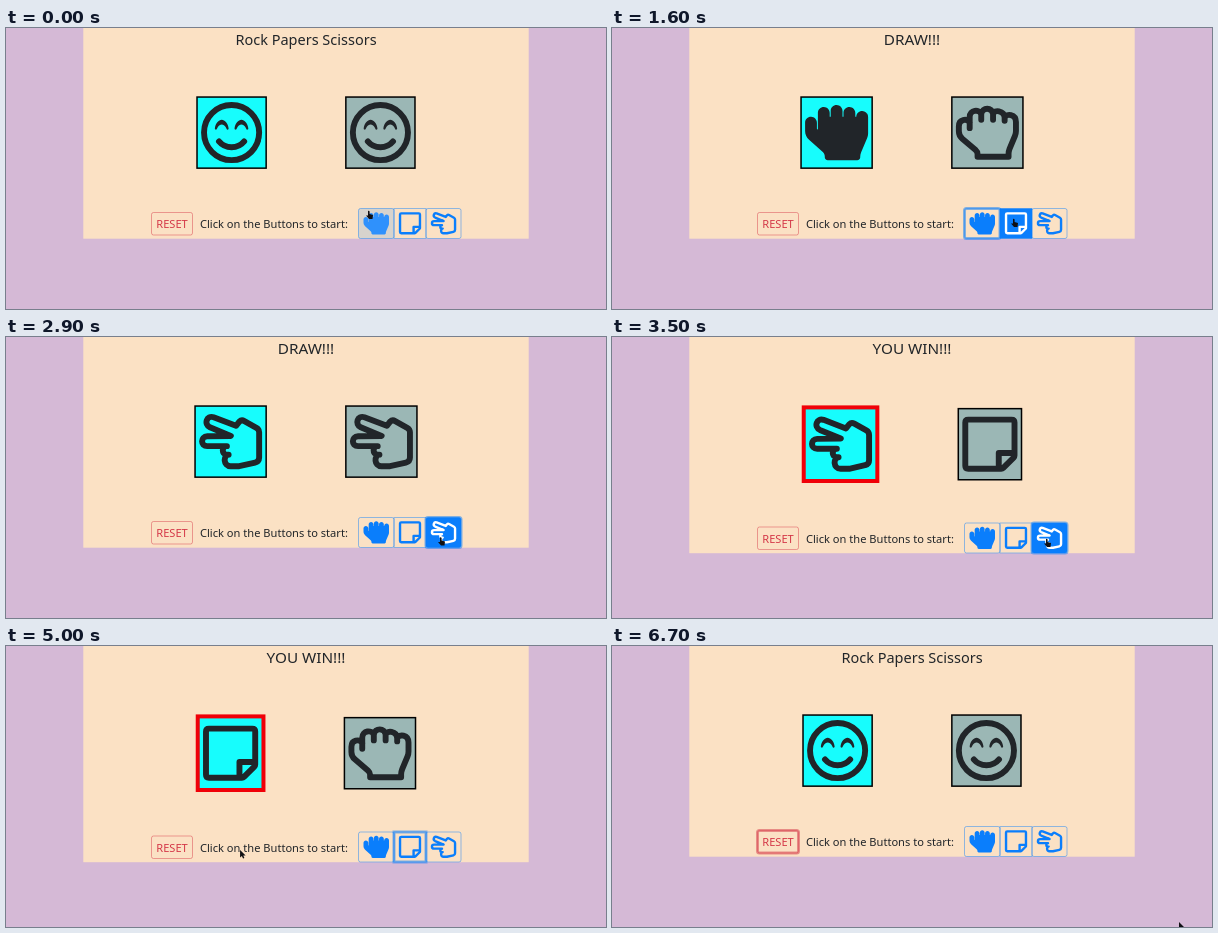
An HTML page that plays this animation: 600 by 281 pixels, repeating every 6800 ms.

```html
<!DOCTYPE html>
<html lang="en">
<head>
<meta charset="utf-8">
<title>Rock Papers Scissors</title>
<style>
  html, body { margin: 0; width: 100%; height: 100%; overflow: hidden; background: #d5b9d6; }
  svg { display: block; width: 600px; height: 281px; }
  text { font-family: "Noto Sans", "Open Sans", sans-serif; font-size: 11.1px; fill: #212529; }
  .line { fill: none; stroke: currentColor; stroke-width: 48; stroke-linecap: round; stroke-linejoin: round; }
  .solid { fill: currentColor; }
  .box { color: #212529; }
</style>
</head>
<body>
<svg viewBox="0 0 600 281">
  <defs>
    <g id="smile" class="line">
      <circle cx="248" cy="256" r="224"/>
      <path d="M145.500 328C197 391 299 391 350.500 328"/>
      <path id="eye" class="solid" stroke="none" d="M136.500 211c7.700-13.700 19.200-21.600 31.500-21.600s23.800 7.900 31.500 21.600l9.500 17c2.100 3.700 6.200 4.700 9.300 3.700 3.600-1.100 6-4.500 5.700-8.300-3.300-42.100-32.200-71.400-56-71.400s-52.700 29.300-56 71.400c-.3 3.700 2.100 7.200 5.700 8.300 3.400 1.100 7.400-.5 9.300-3.700z"/>
      <use href="#eye" x="160"/>
    </g>
    <path id="fist" class="solid" d="M464.800 80c-26.900-.4-48.800 21.200-48.800 48h-8V96.800c0-26.300-20.900-48.300-47.200-48.800-26.900-.4-48.800 21.200-48.800 48v32h-8V80.800c0-26.300-20.900-48.300-47.200-48.800-26.900-.4-48.800 21.200-48.800 48v48h-8V96.800c0-26.300-20.900-48.300-47.200-48.800-26.900-.4-48.800 21.200-48.800 48v136l-8-7.100v-48.100c0-26.300-20.900-48.300-47.200-48.800C21.900 127.600 0 149.200 0 176v66.400c0 27.400 11.700 53.500 32.200 71.800l111.700 99.300c10.200 9.100 16.100 22.200 16.100 35.900v6.700c0 13.300 10.700 24 24 24h240c13.300 0 24-10.700 24-24v-2.900c0-12.800 2.600-25.500 7.500-37.300l49-116.300c5-11.800 7.500-24.500 7.500-37.300V128.800c0-26.300-20.900-48.400-47.200-48.800z"/>
    <path id="rock" class="line" d="M112 220V130C112 70 190 64 206 106C214 46 296 50 302 104C310 68 392 74 396 134C410 98 488 104 488 170V242Q488 262 480 282L436 388Q428 408 428 428V452H176V432Q176 412 158 396L52 306Q24 282 24 246V204C24 146 88 138 112 174M206 106V152M302 104V152M396 134V160"/>
    <path id="note" class="line" d="M48 56H400Q424 56 424 80V348Q424 358 417 365L333 449Q326 456 316 456H48Q24 456 24 432V80Q24 56 48 56ZM296 448V328H416"/>
    <path id="scissors" class="line" d="M256 456H326L455 427Q488 419 488 386V181Q488 156 466 144L368 89Q345 76 327 94L300 128L118 58C62 40 36 116 88 140L258 210L66 213C10 215 10 293 66 293H226C184 293 180 358 224 362H240C194 366 196 456 256 456Z"/>
    <path id="hand" d="M1 0Q2 -.5 2.600 .5V3L6 4L5.500 8H2L-1 4.500L1 4.500Z"/>
    <path id="arrow" d="M0 0V7.500L1.800 6L3 8.500L4.300 8L3.200 5.500H5.500Z"/>
  </defs>
  <rect width="600" height="281" fill="#d5b9d6"/>
  <rect id="panel" x="77.300" width="445.400" fill="#fbe1c4"/>
  <text id="title" x="300" y="17" text-anchor="middle"></text>
  <g id="boxes"></g>
  <g id="controls">
    <text x="194" y="200">Click on the Buttons to start:</text>
  </g>
  <use id="cursor" fill="#101014"/>
</svg>
<script>
const LOOP = 6800, STEP = 100, GROW = 5.5;
const ICON = 63, PAD = 6.6, GAP = 78.2;
const BLUE = [10, 126, 252], RED = [212, 56, 72], WHITE = [255, 255, 255];
const iconWidth = { smile: 496, fist: 512, rock: 512, note: 448, scissors: 512 };

// start, title, player icon, rival icon, player wins, focused button
const rounds = [
  [0, "Rock Papers Scissors", "smile", "smile", false, ""],
  [300, "DRAW!!!", "fist", "rock", false, "fist"],
  [1700, "YOU WIN!!!", "note", "rock", true, "note"],
  [2800, "DRAW!!!", "scissors", "scissors", false, "scissors"],
  [3300, "YOU WIN!!!", "scissors", "note", true, "scissors"],
  [4300, "YOU WIN!!!", "note", "rock", true, "note"],
  [5400, "Rock Papers Scissors", "smile", "smile", false, "reset"]
];

// time, x, y of the pointer tip
const path = [
  [0, 361, 183], [300, 371, 189], [800, 371, 189], [1000, 372, 189], [1300, 372, 189],
  [1600, 400, 191], [2100, 401, 192], [2300, 402, 194], [2600, 433, 200], [3500, 433, 202],
  [3900, 432, 204], [4200, 402, 207], [4600, 400, 207], [5200, 176, 203], [5300, 180, 207],
  [5400, 181, 208.5], [5500, 183, 210], [6000, 578, 273], [6700, 567, 276]
];

const buttons = [
  { name: "reset", x: 145.5, y: 184.5, w: 41, h: 22.5, color: RED },
  { name: "fist", x: 352.5, y: 180.5, w: 35.5, h: 30, color: BLUE },
  { name: "note", x: 388, y: 180.5, w: 32, h: 30, color: BLUE },
  { name: "scissors", x: 420, y: 180.5, w: 35, h: 30, color: BLUE }
];

const byId = id => document.getElementById(id);
const rgb = (c, a = 1) => `rgba(${c.join()},${a})`;
const mix = (a, b, k) => a.map((v, i) => Math.round(v + (b[i] - v) * k));

function add(parent, tag, attrs = {}) {
  const el = document.createElementNS("http://www.w3.org/2000/svg", tag);
  set(el, attrs);
  return parent.appendChild(el);
}

function set(el, attrs) {
  for (const key in attrs) el.setAttribute(key, attrs[key]);
}

function placeIcon(el, name, cx, cy, size) {
  const k = size / 512;
  set(el, {
    href: "#" + name,
    transform: `translate(${cx - iconWidth[name] * k / 2} ${cy - size / 2}) scale(${k})`
  });
}

const boxes = ["#17fdfd", "#9bb7b5"].map(fill => {
  const g = add(byId("boxes"), "g", { class: "box" });
  return { rect: add(g, "rect", { fill }), icon: add(g, "use") };
});

for (const b of buttons) {
  const g = b.group = add(byId("controls"), "g");
  const frame = { x: b.x, y: b.y, width: b.w, height: b.h, rx: b.name === "note" ? 0 : 2 };
  b.ring = add(g, "rect", { ...frame, fill: "none", stroke: rgb(b.color, 0.5), "stroke-width": 3 });
  b.face = add(g, "rect", { ...frame, stroke: rgb(b.color, 0.45) });
  if (b.name === "reset") {
    b.label = add(g, "text", { x: 166, y: 200, "text-anchor": "middle" });
    b.label.textContent = "RESET";
  } else {
    b.label = add(g, "use");
    placeIcon(b.label, b.name, b.x + b.w / 2, 195.3, 25.5);
  }
}

const roundAt = t => rounds.filter(r => r[0] <= t).pop();
const shiftAt = t => roundAt(t)[4] ? GROW : 0;

function pointerAt(t) {
  const i = path.findIndex(p => p[0] > t);
  if (i < 0) return path[path.length - 1].slice(1);
  const [a, b] = [path[i - 1], path[i]];
  const k = (t - a[0]) / (b[0] - a[0]);
  const e = k * k * (3 - 2 * k);
  return [a[1] + (b[1] - a[1]) * e, a[2] + (b[2] - a[2]) * e];
}

function hovers(b, t) {
  const time = (t + LOOP) % LOOP;
  const [x, y] = pointerAt(time);
  const top = b.y + shiftAt(time);
  return x >= b.x && x < b.x + b.w && y >= top && y < top + b.h;
}

function drawBoxes(icons, win) {
  const sizes = icons.map((name, i) => {
    const border = win && i === 0 ? 4 : 1.5;
    return {
      border,
      w: iconWidth[name] * ICON / 512 + PAD + border * 2,
      h: ICON + PAD + border * 2
    };
  });
  let x = 300 - (sizes[0].w + GAP + sizes[1].w) / 2;
  const cy = win ? 107.2 : 104.6;
  boxes.forEach((box, i) => {
    const { border, w, h } = sizes[i];
    set(box.rect, {
      x: x + border / 2, y: cy - h / 2 + border / 2, width: w - border, height: h - border,
      stroke: border === 4 ? "#f00008" : "#000", "stroke-width": border
    });
    placeIcon(box.icon, icons[i], x + w / 2, cy, ICON);
    x += w + GAP;
  });
}

function drawButton(b, t, focus) {
  const pressed = b.name === "reset" && t === 5400;
  // colours fade over about 150 ms
  const fill = pressed ? 1 : 0.15 * hovers(b, t) + 0.85 * hovers(b, t - STEP);
  const ink = rgb(mix(b.color, WHITE, fill));
  b.face.setAttribute("fill", rgb(b.color, fill));
  b.ring.style.display = focus === b.name ? "" : "none";
  if (b.name === "reset") b.label.style.fill = ink;
  else b.label.style.color = ink;
}

function draw(t) {
  const [, title, player, rival, win, focus] = roundAt(t);
  const shift = shiftAt(t);
  byId("panel").setAttribute("height", 210.7 + shift);
  byId("title").textContent = title;
  byId("title").style.fontSize = player === "smile" ? "14.5px" : "15.3px";
  drawBoxes([player, rival], win);
  byId("controls").setAttribute("transform", `translate(0 ${shift})`);
  buttons.forEach(b => drawButton(b, t, focus));
  const [x, y] = pointerAt(t);
  const shape = buttons.some(b => hovers(b, t)) ? "#hand" : "#arrow";
  set(byId("cursor"), { href: shape, x, y });
}

const begin = performance.now();
function tick() {
  const t = (performance.now() - begin) % LOOP;
  draw(Math.floor(t / STEP) * STEP);
  requestAnimationFrame(tick);
}
tick();
</script>
</body>
</html>
```
